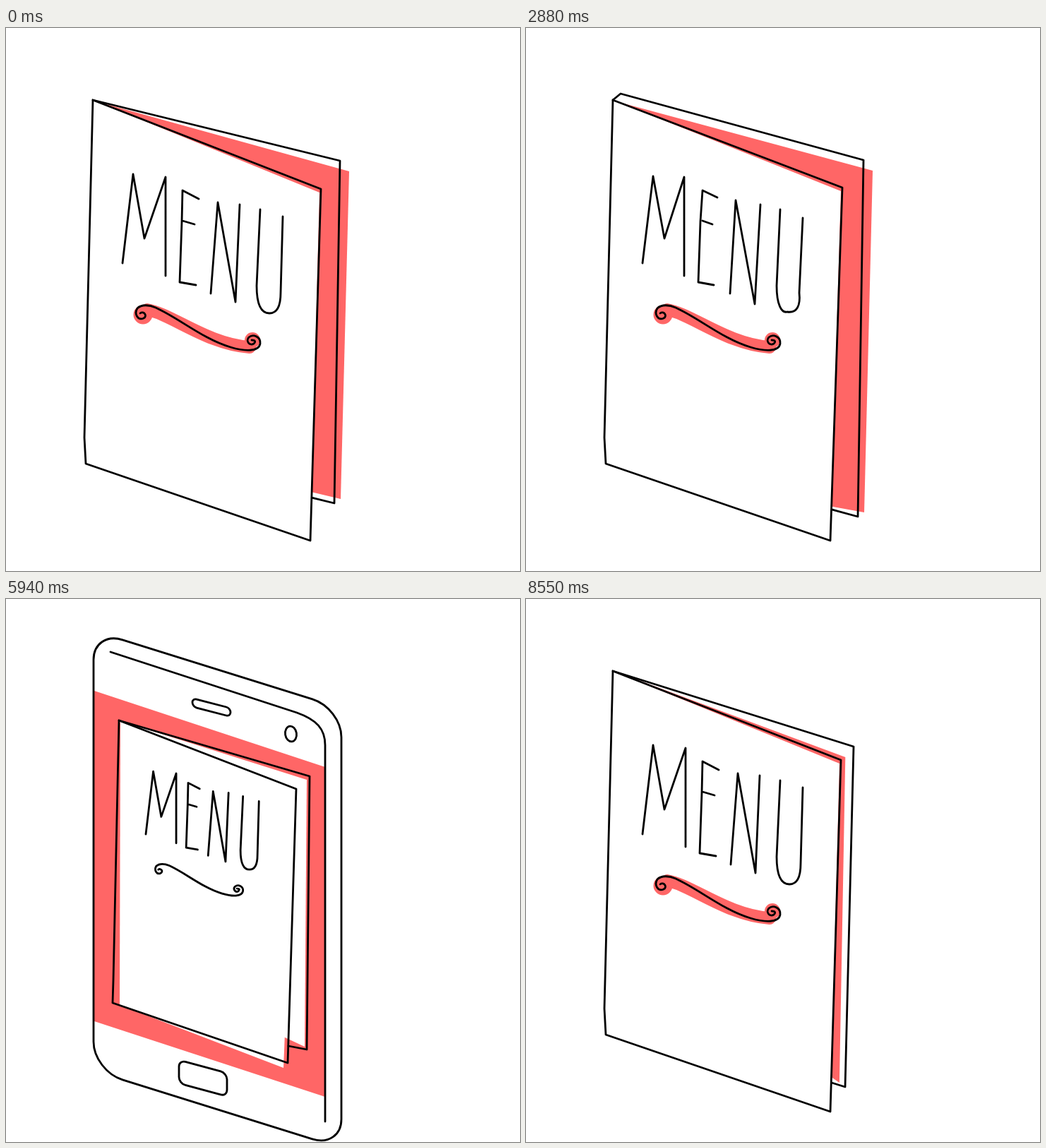
Write an HTML page with a canvas that moves like this. It is 728 by 769 pixels and loops after 8.64 s.

```html
<!DOCTYPE html>
<html lang="en">
<head>
<meta charset="utf-8">
<title>Menu formats</title>
<style>
html, body { margin: 0; width: 100%; height: 100%; overflow: hidden; background: #fff; }
canvas { display: block; }
</style>
</head>
<body>
<canvas id="stage" width="728" height="769"></canvas>
<script>
const ctx = document.getElementById('stage').getContext('2d');
const RED = '#ff6666', LOOP = 8640;
ctx.lineJoin = ctx.lineCap = 'round';

// Outlines: top left, top right, bottom right, bottom left, bend in the left edge
const COVER = [[123,102], [446,228], [431,726], [113,617], [111,580]];
const PHONE = [[124,45], [475,155], [475,778], [124,668], [124,560]];
const SHEET = [[264,273], [725,402], [498,661], [2,518], [54,467]];
const LEAF = [[160,172], [411,269], [399,657], [151,572]];

// Lettering placement for each format
const UPRIGHT = [1, 0, 0, 1, 0, 0];
const ON_PHONE = [.706, 0, 0, .706, 81.5, 98];
const ON_SHEET = [.706, .047, -.456, .45, 262.2, 204.4];

// n = 1 gives the second, slightly different hand-drawn version
const word = n => new Path2D(
  `M165 333L180 ${207 + 3 * n}L196 298L${226 - 2 * n} 211V351` +
  `M${273 - 2 * n} ${242 - 2 * n}L250 230L${249 - 2 * n} 274L${246 - 2 * n} 360L${269 - 3 * n} 364` +
  `M250 273L${267 - 3 * n} 278M${290 - n} 376L${300 - 3 * n} ${247 - 3 * n}L${325 - n} ${388 + 3 * n}L${331 + n} 250` +
  `M360 257L355 365C355 392 362 404 ${373 - 3 * n} ${404 - 2 * n}C384 404 389 393 ${389 - 2 * n} 375L392 ${267 + 2 * n}`);
const WORDS = [word(0), word(1)];
const SWIRL = new Path2D('M190 404C195 400 201 408 195 411C187 415 181 405 186 397C192 391 203 392 212 396' +
  'C245 411 280 441 318 452C338 458 358 459 360 447C361 437 350 433 344 438C339 443 345 451 351 447C354 444 353 442 348 442');
const SWIRL_RED = new Path2D('M200 399C235 405 285 448 345 452');

const BODY = slot(124, 45, 351, 623, 41, .3125);
const SHINE = new Path2D('M148 75L412 161C440 171 452 184 452 207V740');
const KEYS = slot(264, 140.5, 54, 12, 6, .26);
KEYS.addPath(slot(245, 653, 68, 33, 9, .27));
oval(KEYS, 403.5, 191, 8, 11, -.15);

const FORK = new Path2D('M405 605Q399 590 409 580L490 473Q485 468 490 458L519 407L499 464L533 411L515 464' +
  'L545 418L526 468Q517 481 499 478Q492 481 487 488Z');
const KNIFE = new Path2D('M587 419C591 455 575 500 550 528Q532 523 524 537L470 620Q461 630 447 625' +
  'Q445 620 452 613Q490 567 519 528Z');
const GLASS = new Path2D('M428 262C423 310 438 345 468 347C508 347 528 315 526 267' +
  'M467 347L468 380Q467 393 458 398M474 347V380Q474 394 482 398');
oval(GLASS, 477, 265, 49, 14.5, .03);
oval(GLASS, 468.5, 401, 40, 15, 0);

// Rounded box whose horizontal edges fall with the given slope
function slot(x, y, w, h, r, slope) {
  const box = new Path2D(), p = new Path2D();
  box.roundRect(0, 0, w, h, r);
  p.addPath(box, new DOMMatrix([1, slope, 0, 1, x, y]));
  return p;
}

function oval(path, x, y, rx, ry, turn) {
  path.moveTo(x + rx * Math.cos(turn), y + rx * Math.sin(turn));
  path.ellipse(x, y, rx, ry, turn, 0, 2 * Math.PI);
}

const lerp = (a, b, k) => Array.isArray(a) ? a.map((v, i) => lerp(v, b[i], k)) : a + (b - a) * k;
const add = ([x, y], [dx, dy], k = 1) => [x + dx * k, y + dy * k];

function ramp(t, from, to) {
  const k = Math.min(1, Math.max(0, (t - from) / (to - from)));
  return k * k * (3 - 2 * k);
}

function poly(pts, closed = true, radius = 0) {
  const p = new Path2D(), n = pts.length;
  if (radius > 1) {
    p.moveTo(...lerp(pts[n - 1], pts[0], .5));
    pts.forEach((q, i) => p.arcTo(...q, ...pts[(i + 1) % n], radius));
  } else {
    pts.forEach(q => p.lineTo(...q));
  }
  if (closed) p.closePath();
  return p;
}

function fill(path, color = '#fff') {
  ctx.fillStyle = color;
  ctx.fill(path);
}

function stroke(path, part = 1, length = 600, color = '#000', width = 2.8) {
  if (part <= 0) return;
  ctx.setLineDash(part < 1 ? [length * part, length] : []);
  ctx.strokeStyle = color;
  ctx.lineWidth = width;
  ctx.stroke(path);
  ctx.setLineDash([]);
}

// flat = 1 prints the red out of register, as on the placemat
function lettering(place, red = 1, flat = 0, version = 0) {
  if (red > 0) {
    ctx.save();
    ctx.translate(3 * flat, 4 * flat);
    ctx.transform(...place);
    stroke(SWIRL_RED, 1, 0, RED, (18 + 4 * flat) * red);
    const dots = new Path2D();
    oval(dots, 194, 406, 13.5 * red, 13.5 * red, 0);
    oval(dots, 349, 442, 11 * red, 11 * red, 0);
    fill(dots, RED);
    ctx.restore();
  }
  const ink = new Path2D(), m = new DOMMatrix(place);
  ink.addPath(WORDS[version], m);
  ink.addPath(SWIRL, m);
  stroke(ink);
}

function cover(version = 0) {
  const shape = COVER.slice();
  shape[1] = add(shape[1], [2, -2], version);
  const paper = shape.slice();
  paper[1] = add(shape[1], [-2, 5]);
  fill(poly(paper));
  stroke(poly(shape));
  lettering(UPRIGHT, 1, 0, version);
}

// Page behind the cover; its bottom edge runs parallel to its top edge
function panel(start, fold, foot, spread, drop) {
  const slope = (fold[1] - start[1]) / (fold[0] - start[0]);
  const inner = [432, foot[1] - (foot[0] - 432) * slope];
  fill(poly([start, fold, foot, inner]));
  fill(poly([[135, 106], add(fold, [13 * spread, 15]), add(foot, [9 * spread, -6]), add(inner, [0, drop])]), RED);
  stroke(poly([COVER[0], start, fold, foot, inner], false));
}

function bifold(open) {
  panel(COVER[0], [464 + 9 * open, 209 - 21 * open], [452 + 13 * open, 691 - 18 * open], 1.9 * open - .9, -8);
  cover();
}

function trifold(open) {
  const fold = [478 + 22 * open, 187 - 58 * open];
  const foot = [470 + 26 * open, 692 - 46 * open];
  const tip = [134 + 96 * open, 93 - 86 * open];
  if (open > 0) {
    fill(poly([add(tip, [8, -6], open), add(fold, [2, -1]), add(tip, [0, 94], open)]), RED);
    stroke(poly([fold, tip, add(tip, [-2, 300])], false));
  }
  panel(open > 0 ? COVER[0] : tip, fold, foot, 1, 12 * open - 4);
  cover(1);
}

function booklet(t) {
  const shut = 1 - ramp(t, 4350, 4560), pages = 4;
  const [tl, tr, br] = COVER;
  fill(poly([tl, add(tl, [20, -13], shut), add(tr, [39, -25], shut), add(br, [44, -24], shut), br]), RED);
  for (let i = pages; i > 0; i--) {
    const out = i === pages ? 1 : ramp(t, 2800 + 150 * i, 3050 + 150 * i);
    const k = shut * out * i / pages;
    if (k <= 0) continue;
    const foot = add(br, [42, -28], k);
    stroke(poly([tl, add(tl, [20, -14], k), add(tr, [39, -30], k), foot, add(foot, [-9, -4])], false));
  }
  cover();
  const stitches = 10 * ramp(t, 3450, 4200) * shut;
  for (let i = 0; i < stitches; i++) {
    const x = 144 - .8 * i, y = 132 + 49 * i;
    stroke(poly([[x, y], [x - 1, y + 28 * Math.min(1, stitches - i)]], false));
  }
}

function phone(t) {
  const shown = ramp(t, 4860, 5200) * (1 - ramp(t, 5970, 6080));
  const open = ramp(t, 5300, 5850);
  fill(BODY);
  if (shown > 0) {
    const [tl, tr, br, bl] = LEAF;
    const fold = add(tr, [19, -18], open), foot = add(br, [27, -19], open), inner = add(br, [1, -24], open);
    fill(poly([[125,130], [452,238], [452, 238 + 467 * shown], [125, 130 + 468 * shown]]), RED);
    fill(poly([tl, add(fold, [-4, 5]), add(foot, [-3, -4]), add(inner, [-7, -13])]));
    fill(poly([add(tl, [2, 0]), add(tr, [-2, 1]), add(br, [-6, 7]), add(bl, [10, 3])]));
    if (open > 0) stroke(poly([tl, fold, foot, inner], false));
    stroke(poly([...LEAF, [152, 540]]), shown, 1350);
    stroke(SHINE, shown, 900);
    stroke(KEYS, shown, 220);
  }
  stroke(BODY);
  lettering(ON_PHONE, 0);
}

function morph(a, b, placeA, placeB, k, { radius = 0, red = 0, flat = 0, lift = 0 }) {
  const shape = lerp(a, b, k);
  shape[2] = add(shape[2], [0, lift * Math.sin(Math.PI * k)]);
  stroke(poly(shape, true, radius));
  lettering(lerp(placeA, placeB, k), red, flat);
}

function placemat(t) {
  const gone = 1 - ramp(t, 7540, 7860);
  const part = (from, to) => ramp(t, from, to) * gone;
  stroke(poly(SHEET));
  lettering(ON_SHEET, ramp(t, 6390, 6560), 1);
  for (let i = 0; i < 4; i++) {
    const from = [168 - 17.5 * i, 423 + 11 * i + 3.7 * i * i];
    const line = [from, add(from, [116, 45], i === 1 ? .6 : 1)];
    const k = part(6400 + 90 * i, 6620 + 90 * i);
    stroke(poly(line.map(p => add(p, [2, 1])), false), k, 140, RED, 9);
    stroke(poly(line, false), k, 140);
  }
  stroke(FORK, part(6570, 7000), 640);
  stroke(KNIFE, part(6660, 7110), 580);
  stroke(GLASS, part(6750, 7200), 270);
}

function draw(t) {
  ctx.clearRect(0, 0, 728, 769);
  if (t < 840) {
    bifold(1 - .35 * Math.sin(Math.PI * t / 840) ** 2);
  } else if (t < 2940) {
    trifold(Math.sin(Math.PI * ramp(t, 840, 2830) ** 0 * Math.min(1, (t - 840) / 1990)) ** 1.3 > .001
      ? Math.sin(Math.PI * Math.min(1, (t - 840) / 1990)) ** 1.3 : 0);
  } else if (t < 4560) {
    booklet(t);
  } else if (t < 4830) {
    const k = ramp(t, 4560, 4830);
    morph(COVER, PHONE, UPRIGHT, ON_PHONE, k, { radius: 45 * k, red: 1 - k });
  } else if (t < 6080) {
    phone(t);
  } else if (t < 6390) {
    const k = ramp(t, 6060, 6390);
    morph(PHONE, SHEET, ON_PHONE, ON_SHEET, k, { radius: 45 * (1 - k) });
  } else if (t < 7890) {
    placemat(t);
  } else if (t < 8380) {
    const k = ramp(t, 7890, 8380);
    morph(SHEET, COVER, ON_SHEET, UPRIGHT, k, { red: 1, flat: 1 - k, lift: 64 });
  } else {
    bifold((t - 8550) / 90);
  }
}

const begin = performance.now();
function tick() {
  const t = (performance.now() - begin) % LOOP;
  const step = t < 4560 ? 30 : 90;
  draw(Math.floor(t / step) * step);
  requestAnimationFrame(tick);
}
tick();
</script>
</body>
</html>
```
